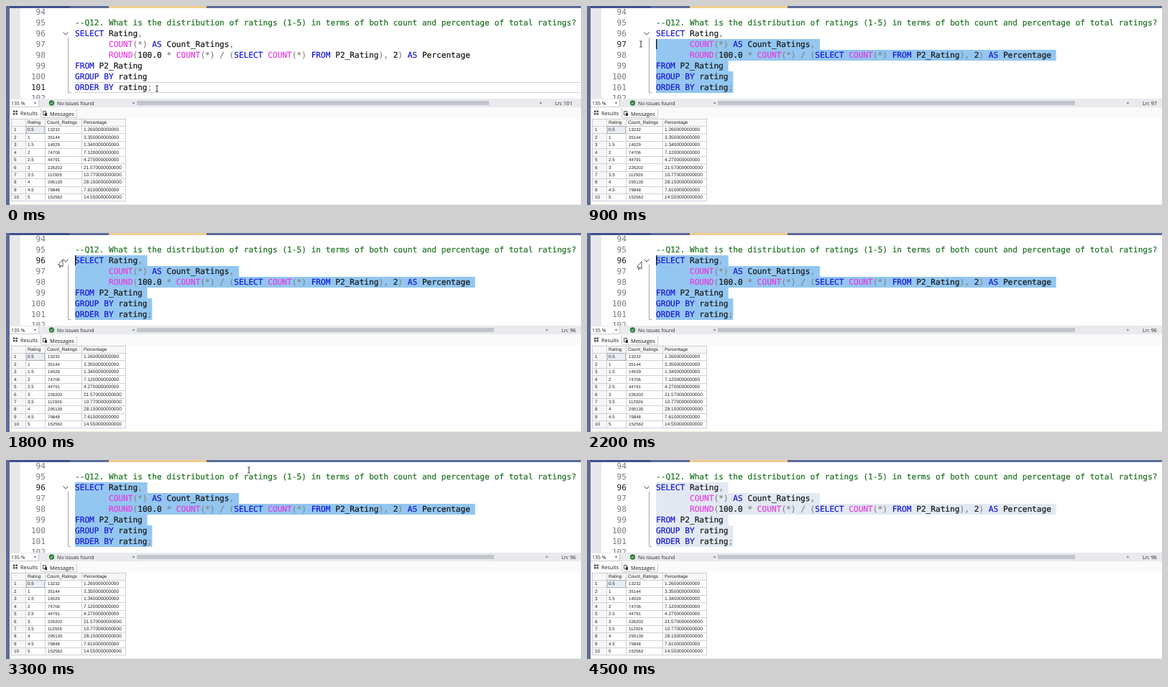
Animation, 800 px wide and 277 px high, one loop 4600 ms. Source, as an HTML page with a canvas:

```html
<!DOCTYPE html>
<html lang="en">
<head>
<meta charset="utf-8">
<title>Ratings query</title>
<style>
html, body { margin: 0; width: 100%; height: 100%; overflow: hidden; background: #fff; }
canvas { display: block; }
</style>
</head>
<body>
<canvas id="stage" width="800" height="277"></canvas>
<script>
const ctx = document.getElementById('stage').getContext('2d');
const LOOP = 4600, LEFT = 96, CHAR = 6.707, ROW = 15;
const MONO = '11.14px "DejaVu Sans Mono", monospace';
const ui = size => size + 'px "Open sans", "Open Sans", sans-serif';
const grid = size => size + 'px "Liberation Sans", Arial, sans-serif';

const CODE = [
  '--Q12. What is the distribution of ratings (1-5) in terms of both count and percentage of total ratings?',
  'SELECT Rating,',
  '       COUNT(*) AS Count_Ratings,',
  '       ROUND(100.0 * COUNT(*) / (SELECT COUNT(*) FROM P2_Rating), 2) AS Percentage',
  'FROM P2_Rating',
  'GROUP BY rating',
  'ORDER BY rating;'
];
const LAST = CODE.length - 1;
const RESULTS = [
  ['0.5', '13232', '1.26'], ['1', '35144', '3.35'], ['1.5', '14029', '1.34'],
  ['2', '74706', '7.12'], ['2.5', '44791', '4.27'], ['3', '226202', '21.57'],
  ['3.5', '112926', '10.77'], ['4', '295135', '28.15'], ['4.5', '79848', '7.61'],
  ['5', '152562', '14.55']
];

// Pointer path: time, x, y
const PATH = [
  [0, 210, 115], [150, 210, 115], [800, 75, 53], [950, 75, 53], [1300, 78, 41],
  [1650, 78, 41], [2000, 73, 46], [2350, 73, 46], [3250, 338, 14], [3350, 338, 14], [3600, 350, -16]
];
const RELEASE = 1700, CARET_OFF = 3300, BLUR = 4250;

const clamp = (v, lo, hi) => Math.min(hi, Math.max(lo, v));
const rowTop = i => 15.5 + ROW * i;

function rect(x, y, w, h, color) {
  ctx.fillStyle = color;
  ctx.fillRect(x, y, w, h);
}
function text(s, x, y, font, color, align = 'left') {
  ctx.font = font;
  ctx.fillStyle = color;
  ctx.textAlign = align;
  ctx.fillText(s, x, y);
}
function line(points, color, width = 1) {
  ctx.beginPath();
  points.forEach(p => ctx.lineTo(...p));
  ctx.strokeStyle = color;
  ctx.lineWidth = width;
  ctx.stroke();
}
function triangle(x, y, dx, dy, color) {
  ctx.beginPath();
  ctx.moveTo(x + dx, y + dy);
  ctx.lineTo(x - dx - dy, y - dy - dx);
  ctx.lineTo(x - dx + dy, y - dy + dx);
  ctx.fillStyle = color;
  ctx.fill();
}

function pointerAt(t) {
  const k = PATH.findIndex(p => p[0] > t);
  if (k < 0) return PATH[PATH.length - 1].slice(1);
  const [t0, x0, y0] = PATH[k - 1], [t1, x1, y1] = PATH[k];
  const u = (t - t0) / (t1 - t0), e = u * u * (3 - 2 * u);
  return [x0 + (x1 - x0) * e, y0 + (y1 - y0) * e];
}

// While dragging, the caret follows the pointer
function caretAt(t) {
  const [x, y] = pointerAt(Math.min(t, RELEASE));
  const row = clamp(Math.floor((y - rowTop(0)) / ROW), 0, LAST);
  return { row, col: clamp(Math.round((x - LEFT) / CHAR), 0, CODE[row].length) };
}

function drawSelection(caret, focused) {
  for (let i = caret.row; i <= LAST; i++) {
    const from = i === caret.row ? caret.col : 0;
    const to = CODE[i].length + (i < LAST ? 1 : 0);
    rect(LEFT + from * CHAR, Math.round(rowTop(i)), (to - from) * CHAR, ROW, focused ? '#93c6f0' : '#e2e9f2');
  }
}

function tokenColor(word, row) {
  if (row === 0) return '#1d7120';
  if (/^(COUNT|ROUND)$/.test(word)) return '#e83ce0';
  if (/^(SELECT|AS|FROM|GROUP|BY|ORDER)$/.test(word)) return '#1717d6';
  return /\w/.test(word) ? '#161616' : '#858585';
}

function drawCode(caret) {
  for (let i = -1; i <= LAST + 1; i++) {
    const base = 27 + ROW * i;
    text(95 + i, 55, base, MONO, i === caret.row ? '#222' : '#777b80', 'right');
    if (!CODE[i]) continue;
    for (const m of CODE[i].matchAll(i ? /[\w.]+|[^\w\s]/g : /\S+/g)) {
      const x = LEFT + m.index * CHAR, color = tokenColor(m[0], i);
      text(m[0], x, base, MONO, color);
      ctx.strokeStyle = color;
      ctx.lineWidth = 0.2;
      ctx.strokeText(m[0], x, base);
    }
  }
  line([[79.5, 36.5], [83, 40], [86.5, 36.5]], '#444');
  line([[86.5, 44], [86.5, 120.5], [90, 120.5]], '#a5a5a5');
}

function drawFrame() {
  rect(0, 0, 5, 277, '#5d6b99');
  rect(5, 0, 795, 3, '#5d6b99');
  rect(5, 0, 84, 3, '#40508d');
  rect(143, 0, 136, 3, '#f0cd8e');
}

function drawStatus(caret) {
  const wide = caret.row === LAST;
  rect(5, 129, 795, 12, '#e9eaee');
  rect(5.5, 130, 40, 10.5, '#fff');
  line([[45.5, 130], [45.5, 140.5], [5, 140.5]], '#c9cbd2');
  text('135 %', 7, 138, ui(7), '#222');
  triangle(40.5, 135.2, 0, 1.3, '#444');

  ctx.beginPath();
  ctx.arc(63.5, 135, 3.7, 0, 7);
  ctx.fillStyle = '#2f7d3a';
  ctx.fill();
  line([[61.7, 135], [63, 136.4], [65.3, 133.7]], '#fff', 0.9);
  text('No issues found', 71, 138, ui(6.85), '#222');

  triangle(177, 135, -1.6, 0, '#7d8088');
  rect(182, 132, wide ? 490 : 497, 6, '#c3c5cc');
  triangle(wide ? 744.5 : 753, 135, 1.6, 0, '#7d8088');
  text('Ln: ' + (95 + caret.row), wide ? 764 : 773, 138, ui(7.1), '#222');
}

function drawTabs() {
  rect(5, 141, 795, 15, '#fafafb');
  rect(5, 141, 43, 15, '#fff');
  line([[48.5, 142], [48.5, 155]], '#c5c7cc');
  line([[98.5, 144], [98.5, 155.5], [49, 155.5]], '#d0d2d6');
  for (const x of [10, 13.5]) for (const y of [145.5, 149]) rect(x, y, 2.4, 2.4, '#444');
  text('Results', 20, 151.5, ui(7.2), '#1d1d1d');
  rect(51, 146, 5, 6, '#666');
  rect(52, 147, 3, 4, '#eee');
  rect(54, 149, 3, 4, '#333');
  text('Messages', 61, 152.5, ui(7.4), '#1d1d1d');
}

function drawResults() {
  const top = 167, step = 10.44, bottom = top + 10 * step;
  rect(5, 156, 795, 121, '#fff');
  rect(7, 156, 159, 11, '#f7f7f8');
  rect(7, 156, 20, bottom - 156, '#f7f7f8');
  rect(28, 167, 26, 10, '#e9eef5');
  for (const x of [7, 27, 54, 105, 166]) line([[x + .5, 156], [x + .5, bottom]], '#cfd1d5');
  for (let i = -1; i <= 10; i++) {
    const y = Math.round(top + i * step) + .5;
    line([[7, y], [167, y]], '#cfd1d5');
  }
  ctx.setLineDash([1, 1]);
  ctx.strokeStyle = '#888';
  ctx.strokeRect(28.5, 167.5, 25, 10);
  ctx.setLineDash([]);

  const ink = '#222';
  text('Rating', 30, 164, grid(6.3), ink);
  text('Count_Ratings', 57, 164, grid(6.35), ink);
  text('Percentage', 108, 164, grid(6.3), ink);
  RESULTS.forEach(([rating, count, share], i) => {
    const y = 174.4 + i * step;
    text(i + 1, 11, y, grid(6.3), ink);
    text(rating, 30, y, grid(6.3), ink);
    text(count, 58, y, grid(6.1), ink);
    text(share + '0'.repeat(10), 108, y, grid(6.55), ink);
  });
  rect(5, 276, 795, 1, '#dfecd2');
}

function drawPointer(t) {
  const [x, y] = pointerAt(t);
  if (y < -8) return;
  ctx.save();
  ctx.translate(x, y);
  if (t > RELEASE && x < LEFT - 8) {
    ctx.beginPath();
    [[3, -6], [3, 4], [.8, 2], [-.8, 5], [-2, 4.4], [-.6, 1.6], [-3.6, 1.4]].forEach(p => ctx.lineTo(...p));
    ctx.closePath();
    ctx.fillStyle = '#fff';
    ctx.fill();
    ctx.strokeStyle = '#333';
    ctx.lineWidth = 0.8;
    ctx.stroke();
  } else {
    line([[0, -4], [0, 4]], '#333');
    line([[-2, -4], [2, -4]], '#333', 0.8);
    line([[-2, 4], [2, 4]], '#333', 0.8);
  }
  ctx.restore();
}

function draw(t) {
  const caret = caretAt(t);
  const selecting = caret.row < LAST || caret.col < CODE[LAST].length;
  ctx.textRendering = 'geometricPrecision';
  rect(0, 0, 800, 277, '#fff');
  rect(5, 3, 15, 126, '#e7e8ec');
  if (selecting) drawSelection(caret, t < BLUR);
  else for (const y of [106.5, 120.5]) line([[LEFT, y], [800, y]], '#d3d3d8');
  drawCode(caret);
  const lit = t < RELEASE || (t - RELEASE) % 1060 < 530;
  if (selecting && lit && t < CARET_OFF)
    rect(Math.round(LEFT + caret.col * CHAR), Math.round(rowTop(caret.row)), 1.3, ROW - 1, '#111');
  drawFrame();
  drawStatus(caret);
  drawTabs();
  drawResults();
  drawPointer(t);
}

const start = performance.now();
function tick() {
  draw((performance.now() - start) % LOOP);
  requestAnimationFrame(tick);
}
tick();
</script>
</body>
</html>
```
